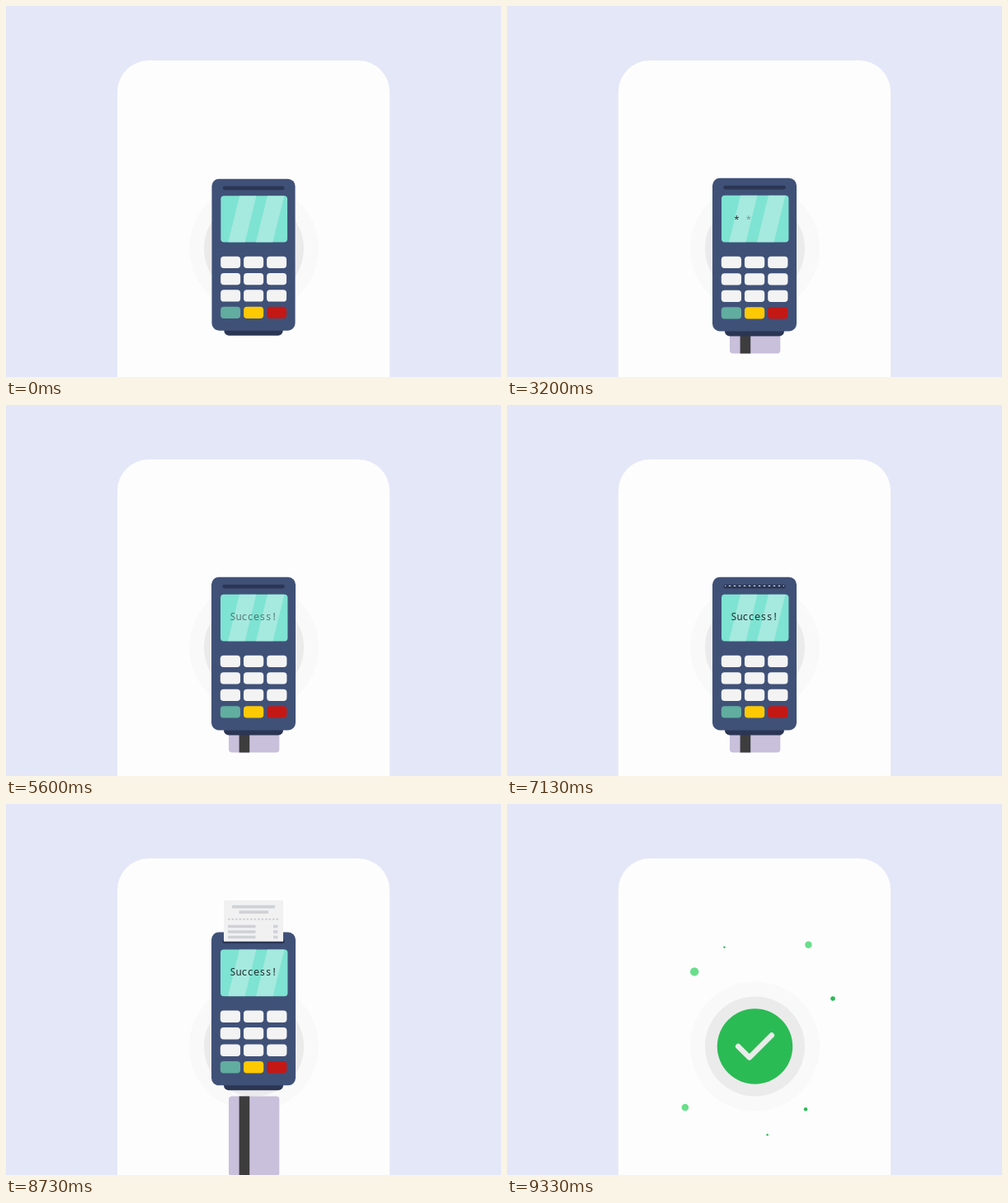
Animation, 600 px wide and 450 px high, one loop 10 s. Source, as an HTML page:

```html
<!DOCTYPE html>
<html lang="en">
<head>
<meta charset="utf-8">
<title>Card payment</title>
<style>
  html, body { margin: 0; width: 100%; height: 100%; overflow: hidden; background: #e4e7f7; }
  svg { display: block; width: 600px; height: 450px; }
  text { font: 12px "Noto Sans Mono", "DejaVu Sans Mono", monospace; fill: #22302f; text-anchor: middle; }
</style>
</head>
<body>
<svg viewBox="0 0 600 450">
  <defs>
    <clipPath id="window"><rect x="135" y="117" width="330" height="333"/></clipPath>
    <clipPath id="feed"><rect x="260" y="100" width="80" height="120"/></clipPath>
    <clipPath id="glass"><rect x="260" y="229.7" width="81.4" height="56.7" rx="4"/></clipPath>
  </defs>
  <rect x="135" y="66" width="330" height="430" rx="38" fill="#fdfdfd"/>
  <circle cx="300.5" cy="294" r="78.5" fill="#f9f9f9"/>
  <circle cx="300.5" cy="294" r="60.5" fill="#ebebeb"/>

  <g id="card">
    <rect x="270" y="324.5" width="61.3" height="97" rx="4" fill="#c9c0dc"/>
    <rect x="282.6" y="324.5" width="12.6" height="97" fill="#3d3d3d"/>
  </g>

  <g clip-path="url(#window)">
    <g id="terminal">
      <rect x="264" y="380" width="72" height="20.5" rx="6" fill="#2b3654"/>
      <rect x="249" y="208.8" width="102" height="185.7" rx="9" fill="#405178"/>
      <rect x="262.3" y="217.8" width="75.6" height="4.6" rx="2.3" fill="#2b3654"/>
      <g clip-path="url(#glass)">
        <rect x="259" y="229" width="84" height="58" fill="#7ee3d2"/>
        <path d="M283 229.5h20.500l-14 57h-20.500zM317 229.500h20.500l-14 57h-20.500z" fill="#a6e9df"/>
      </g>
      <g id="keys"></g>
      <text y="264" id="pin"></text>
      <text x="300" y="261" id="success">Success!</text>
      <g clip-path="url(#feed)">
        <g id="receipt">
          <path id="paper" fill="#f1f1f2"/>
          <path d="M274 176h52v3.600h-52zM282.500 182.500h35.500v3.600h-35.500z
            M269 200h33.500v3.500h-33.500zm0 6.500h33.500v3.500h-33.500zm0 6.500h33.500v3.500h-33.500z
            M324 200h5.400v3.500h-5.400zm0 6.500h5.400v3.500h-5.400zm0 6.500h5.400v3.500h-5.400z" fill="#d0d1d5"/>
          <path d="M269 193h63" stroke="#d0d1d5" stroke-width="2" stroke-dasharray="2.600 1.900"/>
        </g>
      </g>
    </g>
  </g>

  <g id="burst"></g>
  <g id="check">
    <circle cx="300.500" cy="294" r="45.700" fill="#2bbb55"/>
    <path d="M280.200 294L293.800 307.500L320.800 280.500" fill="none" stroke="#ebebeb"
      stroke-width="6.500" stroke-linecap="round" stroke-linejoin="round"/>
  </g>
</svg>
<script>
const LOOP = 10000, CX = 300.5, CY = 294;
const $ = id => document.getElementById(id);

function add(parent, tag, attrs) {
  const el = document.createElementNS('http://www.w3.org/2000/svg', tag);
  for (const k in attrs) el.setAttribute(k, attrs[k]);
  return parent.appendChild(el);
}

for (let row = 0; row < 4; row++)
  for (let col = 0; col < 3; col++)
    add($('keys'), 'rect', {
      x: 259.8 + col * 28.2, y: 303.7 + row * 20.5, width: 24.2, height: 14.4, rx: 4,
      fill: row < 3 ? '#f3f3f4' : ['#61ad9f', '#fdc902', '#c41815'][col]
    });

// Receipt with a serrated top edge
let edge = 'M264 230V163.500';
for (let i = 0; i < 12; i++) edge += 'l3 2.500l3 -2.500';
$('paper').setAttribute('d', edge + 'V230Z');

const stars = [0, 1, 2, 3].map(i => {
  const star = add($('pin'), 'tspan', { x: 278.4 + i * 14.4 });
  star.textContent = '*';
  return star;
});

const LIGHT = '#69de8b', DARK = '#2bbb55';
const dots = [
  [227.2, 203.4, 5.2, LIGHT], [365.4, 170.8, 4.2, LIGHT], [215.9, 368, 4.3, LIGHT],
  [263.5, 173.7, 1.2, DARK], [395, 236, 2.8, DARK], [362, 370.2, 2.2, DARK], [315.6, 401.2, 1.2, DARK]
].map(([x, y, r, fill]) => ({ x, y, r, el: add($('burst'), 'circle', { fill }) }));

const ramp = (t, start, length) => Math.min(1, Math.max(0, (t - start) / length));
const smooth = p => (1 - Math.cos(Math.PI * p)) / 2;
const out = p => 1 - (1 - p) ** 3;
const set = (el, name, value) => el.setAttribute(name, value);
const scaleAt = (x, y, s) => `translate(${x} ${y}) scale(${s}) translate(${-x} ${-y})`;

function draw(t) {
  const enter = smooth(ramp(t, 1530, 630));
  const leave = smooth(ramp(t, 8560, 600));
  const settle = out(ramp(t, 0, 860));
  set($('card'), 'transform', `translate(0 ${160 * (1 - enter + leave)})`);
  set($('terminal'), 'transform',
    `translate(0 ${-284 * leave}) ` + scaleAt(300, 304.6, 0.991 + 0.009 * settle));

  stars.forEach((star, i) => set(star, 'fill-opacity', ramp(t, 2500 + 500 * i, 500)));
  set($('pin'), 'opacity', 1 - ramp(t, 4800, 400));
  set($('success'), 'opacity', ramp(t, 5250, 600));
  set($('receipt'), 'transform', `translate(0 ${58 * (1 - smooth(ramp(t, 7000, 900)))})`);

  const pop = out(ramp(t, 9000, 330));
  set($('check'), 'transform', scaleAt(CX, CY, pop));
  for (const { x, y, r, el } of dots) {
    set(el, 'cx', CX + (x - CX) * pop);
    set(el, 'cy', CY + (y - CY) * pop);
    set(el, 'r', r * pop);
  }
}

const began = performance.now();
function tick() {
  draw((performance.now() - began) % LOOP);
  requestAnimationFrame(tick);
}
tick();
</script>
</body>
</html>
```
